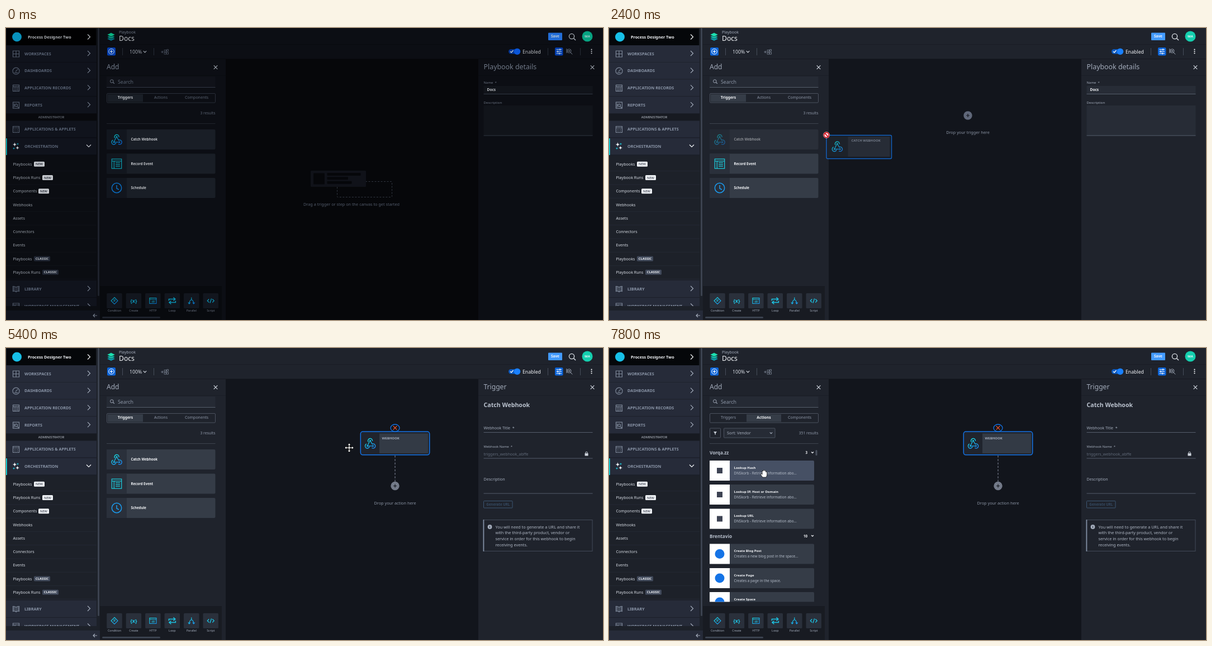
An HTML page for the animation above (8 s loop, 1068 by 524 pixels).

```html
<!DOCTYPE html>
<html lang="en">
<head>
<meta charset="utf-8">
<title>Playbook editor</title>
<style>
html, body { margin: 0; width: 100%; height: 100%; overflow: hidden; background: #12151c; }
svg { display: block; width: 1068px; height: 524px; font-family: "Noto Sans", "Open Sans", sans-serif; }
</style>
</head>
<body>
<svg id="stage" viewBox="0 0 1068 524" xmlns="http://www.w3.org/2000/svg"></svg>
<script>
const PANEL = '#1f232c', NAV = '#262b39', CANVAS = '#12151c', DARK = '#181b22';
const CARD = '#353c47', CARD_ICON = '#2a303b', GREY = '#a3acbb', DIM = '#747d8d', WHITE = '#f4f6f9';
const BLUE = '#1473e6', LINE = '#555d6b';

// Text is placed by the vertical centre of its capitals.
const text = (x, y, s, size, fill = GREY, weight = 400, anchor = 'start') =>
  `<text x="${x}" y="${y + size * .36}" font-size="${size}" fill="${fill}" font-weight="${weight}" text-anchor="${anchor}">${s}</text>`;
const rect = (x, y, w, h, fill, extra = '') =>
  `<rect x="${x}" y="${y}" width="${w}" height="${h}" fill="${fill}" ${extra}/>`;
const circle = (x, y, r, fill, extra = '') => `<circle cx="${x}" cy="${y}" r="${r}" fill="${fill}" ${extra}/>`;
const path = (d, stroke, width = 1, extra = '') =>
  `<path d="${d}" fill="none" stroke="${stroke}" stroke-width="${width}" ${extra}/>`;
const at = (x, y, body, extra = '') => `<g transform="translate(${x} ${y})" ${extra}>${body}</g>`;
const group = (id, body) => `<g id="${id}">${body}</g>`;
const chevron = (x, y, color = GREY) => path(`M${x - 2} ${y - 4.5}l4.5 4.5l-4.5 4.5`, color, 1.2);
const down = (x, y, w = 3, color = GREY) => path(`M${x - w} ${y - w / 2}l${w} ${w}l${w} ${-w}`, color, 1.2);
const cross = (x, y, r, color, w = 1.2) => path(`M${x - r} ${y - r}l${2 * r} ${2 * r}m0 ${-2 * r}l${-2 * r} ${2 * r}`, color, w);
const plus = (x, y, r, color, w = 1.2) => path(`M${x - r} ${y}h${2 * r}M${x} ${y - r}v${2 * r}`, color, w);
const plusDot = (x, y, fill, mark) => circle(x, y, 7.7, fill) + plus(x, y, 3, mark);
const rule = (x, y, w, color = LINE) => rect(x, y, w, 1, color);

const glow = 'url(#glow)';
const icons = {
  webhook: path('M-1 -3.5L-5 4.5M0 -4.5L4.2 2.2M-4.5 4.8H5', glow, 1.3) +
    [[0, -4.7], [-5, 4.8], [5, 4.8]].map(([x, y]) => circle(x, y, 1.4, glow)).join('') +
    path('M-3.4 -2.6A4 4 0 1 1 4 -4M-6.5 1.2A4 4 0 1 0 -1.2 6M3 8.2A4 4 0 1 0 4.2 1', glow, 1.4),
  record: path('M-8.7 -8.5H8.7V8.5H-8.7ZM-8.7 -4.7H8.7M-4.7 -4.7V8.5M-2 -1.7H6M-2 1.5H6M-2 4.7H6', '#1ccbdc', 1.25),
  clock: circle(0, 0, 8.7, 'none', 'stroke="#1b9cf0" stroke-width="1.5"') + path('M0 -5V1L4 3', '#1b9cf0', 1.5),
  condition: path('M0 -6L6 0L0 6L-6 0Z', glow, 1.1) + text(0, 0, 'IF', 4.5, '#1fc8e8', 700, 'middle'),
  create: text(0, 0, '{x}', 9, '#1fc8e8', 700, 'middle'),
  http: path('M-6 -5H6V5H-6ZM-6 -2.5H6', glow, 1.1) + text(0, 1.7, ':ill', 5, '#1fc8e8', 700, 'middle'),
  loop: path('M-6 0V-3H5M2 -6L5.5 -3L2 0M6 0V3H-5M-2 0L-5.5 3L-2 6', '#1cc4e4', 1.5),
  parallel: path('M0 -6V-2Q-4 0 -4 5M0 -2Q4 0 4 5M-6 3L-4 5.5L-2 3M2 3L4 5.5L6 3', glow, 1.2),
  script: path('M-3 -3L-6 0L-3 3M3 -3L6 0L3 3M1.3 -4L-1.3 4', '#1cc4e4', 1.3)
};
const navIcons = {
  grid: 'M-5.5 -5.5H5.5V5.5H-5.5ZM0 -5.5V5.5M-5.5 0H5.5',
  gauge: 'M-6 0A6 6 0 1 1 6 0A6 6 0 1 1 -6 0M-1 1L3 -3M-3 3H3',
  table: 'M-5.5 -5.5H5.5V5.5H-5.5ZM-5.5 -2.5H5.5M-2 -2.5V5.5M0 0H4M0 3H4',
  report: 'M-5.5 -5.5H5.5V5.5H-5.5ZM-2 0A2.3 2.3 0 1 1 2.6 0A2.3 2.3 0 1 1 -2 0M2 2L5 5M-3.5 -3V4',
  apps: 'M-5.5 -5.5H5.5V5.5H-5.5ZM-5 -3H5M-3 0H-1M1 0H3M-3 3H-1M1 3H3',
  book: 'M0 -3V5Q-3 3 -5.5 4V-5Q-2 -5 0 -3Q2 -5 5.5 -5V4Q3 3 0 5M-3.5 -4V3M3.5 -4V3'
};

function sidebar() {
  const row = (y, label, icon, h = 30) => rect(0, y - 15, 162, h, NAV) + rule(0, y + 15, 162, '#1b1f28') +
    (icon ? at(18, y + .5, path(navIcons[icon], '#7c8798', 1.2)) : '') +
    text(33, y, label, 7.2, '#8b96a8', 600);
  const badge = (x, y, label) => {
    const fresh = label === 'NEW', w = fresh ? 19 : 29;
    return rect(x, y - 4.5, w, 9, fresh ? '#eef1f5' : '#414a5b', 'rx="1.5"') +
      text(x + w / 2, y, label, 5.8, fresh ? '#262b39' : WHITE, fresh ? 400 : 700, 'middle');
  };
  const subs = [['Playbooks', 'NEW', 50], ['Playbook Runs', 'NEW', 65], ['Components', 'NEW', 58], ['Webhooks'],
    ['Assets'], ['Connectors'], ['Events'], ['Playbooks', 'CLASSIC', 50], ['Playbook Runs', 'CLASSIC', 65]];
  const top = [['WORKSPACES', 'grid'], ['DASHBOARDS', 'gauge'], ['APPLICATION RECORDS', 'table'], ['REPORTS', 'report']];
  const star = (x, y, r, c) => `<path d="M${x} ${y - r}Q${x} ${y} ${x + r} ${y}Q${x} ${y} ${x} ${y + r}Q${x} ${y} ${x - r} ${y}Q${x} ${y} ${x} ${y - r}" fill="${c}"/>`;
  return rect(0, 0, 168, 524, '#1d2129') + rect(1, 1, 160, 30, '#05070a') +
    circle(19.5, 16, 8.5, '#17bfe6') +
    text(39, 16, 'Process Designer Two', 7.2, WHITE, 700) + chevron(148, 16, WHITE) +
    top.map(([label, icon], i) => row(46 + i * 30.7, label, icon) + chevron(148, 45.5 + i * 30.7)).join('') +
    rect(0, 154, 162, 12.5, '#171a21') + text(81, 160, 'ADMINISTRATOR', 5.85, '#c6ccd6', 400, 'middle') +
    row(181.5, 'APPLICATIONS &amp; APPLETS', 'apps') + row(212.5, 'ORCHESTRATION') +
    rect(0, 198, 1.7, 30, '#12e0e6') + down(148, 211.5, 4, WHITE) +
    star(15.5, 209, 4.5, WHITE) + star(20.5, 215, 4, WHITE) + star(21, 208, 2.5, '#19d3e6') + star(14, 216, 2.5, '#19d3e6') +
    subs.map(([label, tag, x], i) => {
      const y = 244.2 + i * 24.25;
      return text(12.5, y, label, 7.1, '#d5dae2') + (tag ? badge(x, y, tag) : '') + rule(0, y + 12, 162, '#242934');
    }).join('') +
    row(468, 'LIBRARY', 'book') + chevron(148, 467.5) +
    `<g clip-path="url(#navClip)">${row(499, 'WORKSPACE MANAGEMENT', 'table')}${chevron(148, 499)}</g>` +
    rect(0, 507, 168, 17, NAV) + path('M163 516H156M159 513L156 516L159 519', GREY, 1.2) +
    rect(164, 0, 3, 481, '#3b424f', 'rx="1.5"');
}

function header() {
  const layer = (y, c) => `<path d="M180.5 ${y}l7.5 -3.7l7.5 3.7l-7.5 3.7z" fill="${c}" stroke="${PANEL}" stroke-width=".7"/>`;
  return rect(168, 0, 900, 56, PANEL) + rule(168, 29, 900, '#191c24') + rule(168, 55, 900, '#171a21') +
    layer(19.5, '#0ba4b4') + layer(16, '#10bfae') + layer(12, '#1de0b0') +
    text(202, 7, 'Playbook', 7, GREY) + text(202, 19, 'Docs', 12.2, WHITE, 500) +
    rect(970, 8.5, 25, 13.5, '#439bff', 'rx="1"') + text(982.5, 15, 'Save', 6.4, WHITE, 700, 'middle') +
    circle(1012, 15, 4.6, 'none', 'stroke="#dfe4ea" stroke-width="1.3"') + path('M1015.5 18.5l3.5 3.5', '#dfe4ea', 1.4) +
    circle(1040, 15, 9.5, '#15cfae') + text(1040, 15, 'MA', 6, WHITE, 700, 'middle') +
    rect(181, 35, 15, 14.5, '#0b63d8', 'rx="2"') + circle(188.5, 42.2, 4.8, 'none', 'stroke="#fff"') + plus(188.5, 42.2, 2.7, '#fff') +
    [208, 264, 969, 1027].map(x => rect(x, 36, 1, 13, '#464d5a')).join('') +
    text(221, 42.5, '100%', 8.7, '#d5dae2') + down(248.5, 42.5, 2.7, '#d5dae2') +
    plus(279.5, 43, 2.2, DIM, 1) + path('M283 43.5h3.5v3.5h-3.5zM287 43.5h3.5v3.5H287zM283 39.5h3.5v3.5h-3.5zM287.5 38.5h3v3h-3z', DIM, .9) +
    rect(899, 38, 21, 8.5, '#0d5ac0', 'rx="4.2"') + path('M902 42l2 2l3.5 -4', '#fff', 1.2) + circle(914.5, 42.2, 5.8, '#1a80ff') +
    text(924, 42.5, 'Enabled', 8.7, WHITE) +
    rect(982, 35, 14.5, 14.5, '#0b63d8', 'rx="2"') + path('M984.5 38.7h9.5M984.5 42.2h9.5M984.5 45.7h9.5M991 37v3.4M987 40.5v3.4M990 44v3.4', '#fff', 1.1) +
    circle(1007.5, 41.2, 3.4, 'none', `stroke="${GREY}"`) + circle(1007.5, 41.2, 1.3, GREY) + path('M1010 44l3.3 3.3M1003 37v8', GREY, 1) +
    [38.7, 42, 45.3].map(y => circle(1047.5, y, 1.1, WHITE)).join('');
}

function addPanel() {
  const trigger = (y, icon, label, id) => `<g ${id ? `id="${id}"` : ''}>` +
    rect(180, y, 194.5, 36, CARD, 'rx="2" ' + (id ? 'id="cardBody"' : '')) + rect(180, y, 36, 36, CARD_ICON) +
    at(198, y + 18, icons[icon]) + text(223.5, y + 18, label, 6.1, WHITE, 700) + '</g>';
  const step = (y, color, title, note, id = '') =>
    rect(180, y, 187, 36, CARD, `rx="2" ${id}`) + rect(180, y, 36, 36, '#fff') +
    (color === BLUE ? circle(198, y + 18, 8.5, color) : rect(193, y + 13, 10, 10, color)) +
    text(223.5, y + 12.5, title, 6, WHITE, 700) + text(223.5, y + 22.5, note, 6.4, '#b4bcc9');
  const lookup = 'DNSkorb - Retrieve information abo...';
  const tools = [['condition', 'Condition'], ['create', 'Create'], ['http', 'HTTP'], ['loop', 'Loop'], ['parallel', 'Parallel'], ['script', 'Script']];
  return rect(168, 56, 225, 468, PANEL) + text(180, 69.5, 'Add', 12, GREY, 500) + cross(375, 70.5, 3.3, '#cdd3dc') + rule(168, 85, 225, '#1a1e26') +
    rect(180, 87, 194.5, 20, '#252a34') + rule(180, 106, 194.5) +
    circle(189.3, 95.5, 2.8, 'none', `stroke="${GREY}"`) + path('M191.5 97.5l2.3 2.3', GREY, 1.1) + text(200, 97, 'Search', 8.8, '#8d97a7') +
    rect(180.5, 117.5, 194, 16.5, 'none', `rx="1.5" stroke="#4b525f"`) +
    rect(182, 119, 63, 13.5, CARD, 'id="tabTriggers"') + rect(246, 119, 62, 13.5, CARD, 'id="tabActions"') +
    group('labelsTriggers', text(213.5, 124.5, 'Triggers', 6.7, WHITE, 700, 'middle') + text(277, 124.5, 'Actions', 7, '#8d97a7', 400, 'middle')) +
    group('labelsActions', text(213.5, 124.5, 'Triggers', 7, '#8d97a7', 400, 'middle') + text(277, 124.5, 'Actions', 6.8, WHITE, 700, 'middle')) +
    text(341, 124.5, 'Components', 7, '#8d97a7', 400, 'middle') + rule(180, 171, 194.5, '#3d444f') +
    group('triggerList', text(374.5, 152.5, '3 results', 6.8, '#8d97a7', 400, 'end') +
      trigger(182, 'webhook', 'Catch Webhook', 'catchCard') + trigger(225.5, 'record', 'Record Event') + trigger(269, 'clock', 'Schedule')) +
    group('actionList', text(374.5, 152.5, '351 results', 6.8, '#8d97a7', 400, 'end') +
      rect(180.5, 144, 19, 17, 'none', 'stroke="#4b525f" rx="1"') + `<path d="M187 150h6l-2.3 3v3l-1.4 -1v-2z" fill="#cdd3dc"/>` +
      rect(205.5, 144, 91.5, 17, '#262b35', 'stroke="#4b525f" rx="1"') + text(211, 152.5, 'Sort: Vendor', 7.3, '#a7b0be', 500) + down(290, 152.5, 2.2) +
      text(180, 188, 'Vorqa.zz', 8.2, '#b5bdca', 600) + text(355, 188, '3', 6.2, WHITE, 600, 'end') + down(364, 187.5, 2, WHITE) +
      rect(369.5, 183, 3, 10, '#4a515e', 'rx="1.5"') +
      text(180, 338, 'Brentavio', 8.2, '#b5bdca', 600) + text(355, 337.5, '10', 6.2, WHITE, 600, 'end') + down(364, 337, 2, WHITE) +
      `<g clip-path="url(#listClip)">` +
      step(202, '#3d4353', 'Lookup Hash', lookup, 'id="hashCard"') + step(245, '#3d4353', 'Lookup IP, Host or Domain', lookup) + step(288.5, '#3d4353', 'Lookup URL', lookup) +
      step(351.5, BLUE, 'Create Blog Post', 'Creates a new blog post in the space...') + step(395, BLUE, 'Create Page', 'Creates a page in the space.') +
      step(438, BLUE, 'Create Space', '') + '</g>') +
    rect(168, 463, 218, 61, DARK) +
    tools.map(([icon, label], i) => {
      const x = 194 + i * 34.45;
      return rect(x - 13.8, 476, 27.5, 27, CARD_ICON, 'rx="1.5"') + at(x, 489.5, icons[icon]) + text(x, 507.5, label, 5.3, GREY, 400, 'middle');
    }).join('') + rect(172, 518, 104, 3, '#3b424f', 'rx="1.5"');
}

function canvasArea() {
  return rect(393, 56, 452, 468, CANVAS) +
    group('hint', rect(592.5, 275.5, 98, 28, 'none', 'stroke="#565c69" stroke-dasharray="3 2.5" rx="1"') +
      rect(545, 256, 99, 29, '#252935', 'rx="1.5"') + rect(550, 260.5, 20, 20, CANVAS, 'rx="1"') +
      [[60, 260], [37.5, 267.3], [44, 274.7]].map(([w, y]) => rect(574.5, y, w, 5, CANVAS, 'rx="1"')).join('') +
      text(618, 316, 'Drag a trigger or step on the canvas to get started', 7.3, '#8a93a3', 400, 'middle')) +
    group('target', circle(641.5, 157, 25.7, '#102f58', 'id="halo"') + group('targetIdle', plusDot(642, 157, '#60687a', CANVAS)) +
      group('targetHot', plusDot(642, 157, '#0b6dff', '#fff')) +
      text(642, 187.5, 'Drop your trigger here', 7.3, '#8a93a3', 400, 'middle')) +
    group('node', rect(634.3, 150, 123.4, 41.8, '#20242d', `rx="4" stroke="${BLUE}" stroke-width="1.5"`) +
      rect(668, 153.5, 87, 35.5, '#333a45') + at(651.5, 171, icons.webhook) + text(672.5, 161.5, 'WEBHOOK', 6, GREY, 600) +
      `<ellipse cx="696" cy="143.5" rx="8" ry="6.5" fill="${CANVAS}" stroke="${BLUE}" stroke-width="1.3"/>` + cross(696, 143.3, 3.3, '#f0552d', 1.2) +
      path('M696 193V240', '#737a89', 1.2, 'stroke-dasharray="3.5 2.7"') + plusDot(696, 247.5, '#737a89', CANVAS) +
      text(696, 278, 'Drop your action here', 7.3, '#8a93a3', 400, 'middle'));
}

function detailsPanel() {
  const field = (y, h) => rect(854.5, y, 195, h, '#272c36') + rule(854.5, y + h - 1, 195);
  const info = ['You will need to generate a URL and share it', 'with the third-party product, vendor or', 'service in order for this webhook to begin', 'receiving events.'];
  return rect(845, 56, 223, 468, PANEL) + cross(1049, 70.5, 3.3, '#cdd3dc') + rule(845, 85, 223, '#1a1e26') +
    group('playbookForm', text(854.5, 69.5, 'Playbook details', 12.4, GREY, 500) +
      text(854.5, 98, 'Name &#160;*', 6, GREY) + field(104, 15) + text(860.5, 111, 'Docs', 6.6, WHITE, 600) +
      text(854.5, 133.5, 'Description', 6.1, GREY) + field(139, 54.5)) +
    group('triggerForm', text(854.5, 69.5, 'Trigger', 12.1, GREY, 500) + text(854.5, 102.5, 'Catch Webhook', 10.6, '#bac2ce', 600) +
      text(854.5, 143, 'Webhook Title &#160;*', 7.1, GREY) + rule(854.5, 151, 195) +
      text(854.5, 176.5, 'Webhook Name &#160;*', 6, GREY) + text(854.5, 190, 'triggers_webhook_abffe', 7.05, '#5f6877') + rule(854.5, 197.5, 195) +
      rect(1035.5, 189, 6, 4.5, '#cdd3dc', 'rx=".6"') + path('M1036.8 189v-1a1.7 1.7 0 0 1 3.4 0v1', '#cdd3dc', 1) +
      text(854.5, 235.5, 'Description', 7.1, GREY) + rule(854.5, 260.5, 195) +
      rect(854.5, 274.5, 51.5, 12.5, 'none', 'stroke="#3c5672" rx="1"') + text(880.3, 280.5, 'Generate URL', 6.1, '#354a62', 700, 'middle') +
      rect(854.5, 308.5, 194.5, 56, 'none', 'stroke="#434a58"') + rect(853.5, 308, 1.8, 57, '#8290a5') +
      circle(865.5, 321, 3.9, GREY) + text(865.5, 321, 'i', 6, PANEL, 700, 'middle') +
      info.map((s, i) => text(875.5, 321 + i * 10.65, s, 7.3, '#b0b8c5')).join(''));
}

function overlays() {
  const ghost = rect(.5, .5, 116.5, 42, '#191d25', `rx="2" stroke="${BLUE}" stroke-width="1.4"`) +
    rect(3, 3, 36, 36, '#20252e') + rect(39, 3, 75, 36, '#2c323c') + at(19.8, 20.5, icons.webhook) + text(45, 10, 'CATCH WEBHOOK', 6, '#8a93a3', 600);
  const shape = (d, fill = '#fff', stroke = '#111') => `<path d="${d}" fill="${fill}" stroke="${stroke}" stroke-width=".8" stroke-linejoin="round"/>`;
  const arrow = shape('M0 0V11.5L2.7 9L4.7 13.5L6.7 12.6L4.7 8.3H8.3Z');
  const hand = shape('M-1.5 -6Q0 -8 1.3 -6V-1.5Q3 -2.5 4 -1Q5.5 -1.7 6.2 0Q7.8 0 7.6 2Q7.6 6 5.5 9.5H-1.5Q-3 6 -5.3 3Q-5 .8 -1.5 3.5Z');
  const grab = shape('M-3 6Q-5.5 3 -6 .5Q-4.5 -.5 -3 2V-4Q-2 -5.5 -1 -4V-5.5Q.3 -7 1.3 -5.5V-4.5Q2.6 -6 3.6 -4V-2.5Q5 -3.5 5.7 -2V3Q5 5.5 4 7H-2Z');
  const head = 'M0 -8L3 -5H1V-1H5V-3L8 0L5 3V1H1V5H3L0 8L-3 5H-1V1H-5V3L-8 0L-5 -3V-1H-1V-5H-3Z';
  const cursors = {
    arrow, hand, grab, move: shape(head),
    copy: arrow + rect(7.5, 15, 7, 7, '#fff', 'stroke="#111"') + plus(11, 18.5, 2, '#111', 1),
    nodrop: circle(0, 0, 5.8, '#fff') + circle(0, 0, 4.5, '#fff', 'stroke="#d3121f" stroke-width="1.9"') + path('M-3.2 -3.2L3.2 3.2', '#d3121f', 1.9)
  };
  return group('ghost', ghost) +
    group('cursor', Object.entries(cursors).map(([name, body]) => group('cursor-' + name, body)).join(''));
}

const stage = document.getElementById('stage');
const channels = ['R', 'G', 'B'].map(c => `<feFunc${c} type="gamma" exponent="1.35" amplitude=".85"/>`).join('');
stage.innerHTML = `<defs>
  <linearGradient id="glow" gradientUnits="userSpaceOnUse" x1="-6" y1="-8" x2="6" y2="8"><stop stop-color="#17e3e0"/><stop offset="1" stop-color="#1a8cf5"/></linearGradient>
  <clipPath id="navClip"><rect y="484" width="168" height="15"/></clipPath>
  <clipPath id="listClip"><rect x="168" y="175" width="225" height="280.5"/></clipPath>
  <filter id="fade" filterUnits="userSpaceOnUse" x="0" y="0" width="1068" height="524" color-interpolation-filters="sRGB">
    <feComponentTransfer>${channels}</feComponentTransfer></filter>
</defs>` + group('screen', canvasArea() + addPanel() + detailsPanel() + header() + sidebar() + overlays());

const $ = id => document.getElementById(id);
const show = (id, on) => { $(id).style.display = on ? '' : 'none'; };

// time, x, y of the pointer
const track = [[800, 305, 216], [1400, 285, 204], [1800, 290, 203], [2400, 389, 192], [3600, 625, 164],
  [4000, 642, 160], [4800, 642, 160], [5400, 614, 179], [6000, 400, 160], [6600, 285, 132], [7000, 285, 132], [7800, 277, 225]];

function pointer(t) {
  const next = track.findIndex(k => k[0] >= t);
  if (next < 1) return track[0].slice(1);
  const [t0, x0, y0] = track[next - 1], [t1, x1, y1] = track[next];
  const p = (t - t0) / (t1 - t0);
  return [x0 + (x1 - x0) * p, y0 + (y1 - y0) * p];
}

function cursorKind(t, x, y, dragging, hot) {
  if (hot) return 'copy';
  if (dragging) return 'nodrop';
  if (t < 1800) return 'grab';
  if (x > 393) return 'move';
  if (y > 202) return 'grab';
  return y > 117 && y < 134 && x < 308 ? 'hand' : 'arrow';
}

function render(ms) {
  const t = Math.floor(ms % 8000 / 200) * 200;
  const [x, y] = pointer(t);
  const dragging = t >= 1800 && t < 5000, dropped = t >= 5000, actions = t >= 7000;
  const hot = dragging && Math.hypot(x - 642, y - 157) < 15;
  const kind = cursorKind(t, x, y, dragging, hot);

  $('screen').setAttribute('filter', t < 200 ? 'url(#fade)' : 'none');
  show('hint', t < 1800);
  show('target', dragging);
  show('halo', hot);
  show('targetHot', hot);
  show('targetIdle', !hot);
  show('node', dropped);
  show('playbookForm', !dropped);
  show('triggerForm', dropped);
  show('triggerList', !actions);
  show('actionList', actions);
  show('labelsTriggers', !actions);
  show('labelsActions', actions);
  show('tabTriggers', t < 7200);
  show('tabActions', actions);
  $('tabTriggers').setAttribute('fill', actions ? '#2d333e' : CARD);
  $('tabActions').setAttribute('fill', t < 7200 ? '#292e38' : CARD);
  $('catchCard').setAttribute('opacity', dragging ? .5 : 1);
  $('cardBody').setAttribute('fill', t >= 800 && t < 1800 ? '#465064' : CARD);
  $('hashCard').setAttribute('fill', actions && y > 202 ? '#465064' : CARD);

  show('ghost', dragging);
  $('ghost').setAttribute('transform', `translate(${x - .5} ${y})`);
  $('ghost').setAttribute('opacity', .82);
  show('cursor', t >= 800);
  $('cursor').setAttribute('transform', `translate(${x} ${y})`);
  for (const name of ['arrow', 'hand', 'grab', 'move', 'copy', 'nodrop']) show('cursor-' + name, name === kind);
}

const start = performance.now();
function tick() {
  render(performance.now() - start);
  requestAnimationFrame(tick);
}
tick();
</script>
</body>
</html>
```
